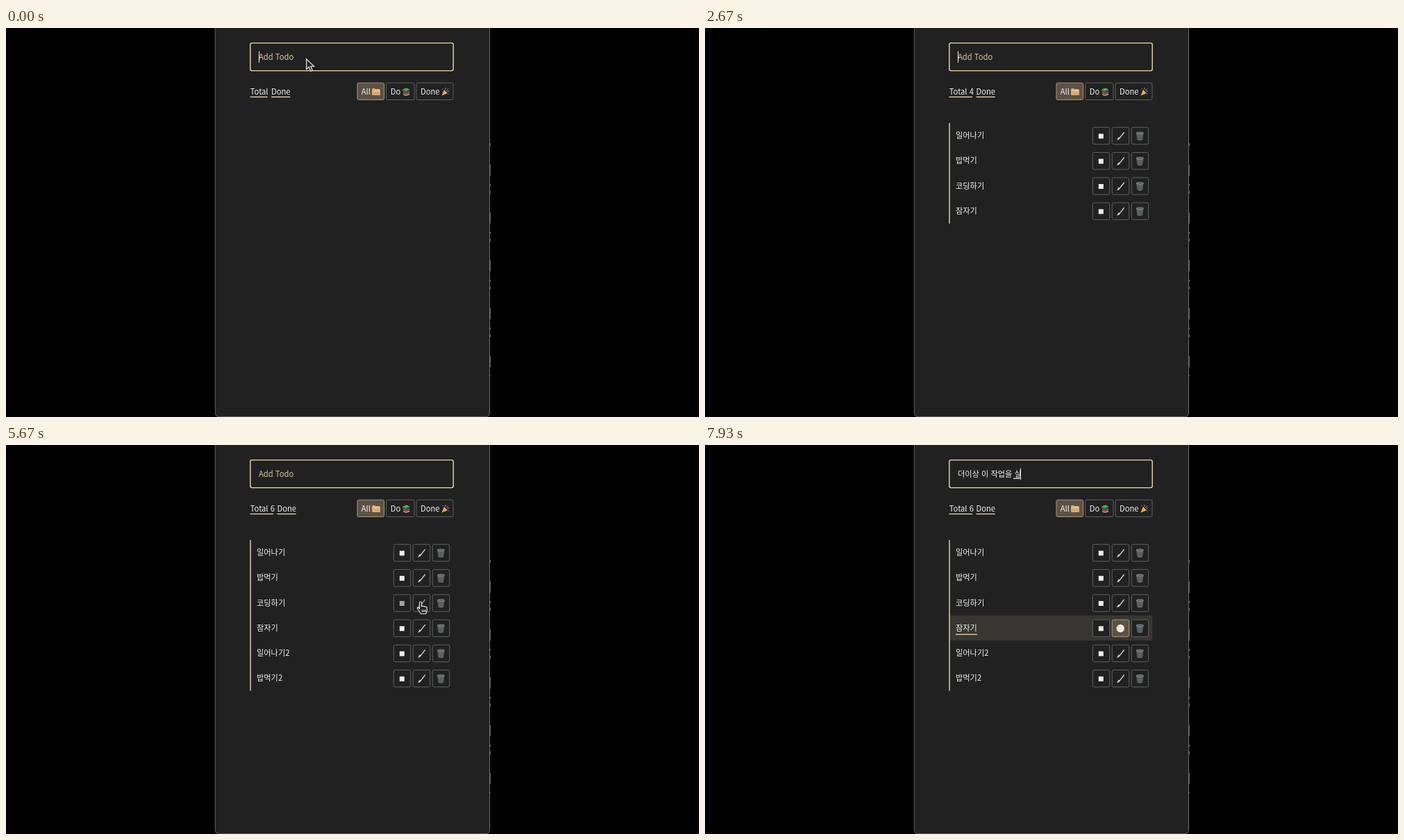
An HTML page for the animation above (8000 ms loop, 998 by 561 pixels).

```html
<!DOCTYPE html>
<html lang="ko">
<head>
<meta charset="utf-8">
<title>Todo list</title>
<style>
  html, body { margin: 0; height: 100%; overflow: hidden; background: #000; }
  svg { display: block; width: 998px; height: 561px; }
  text { font: 11.2px "Noto Sans CJK KR", "Noto Sans KR", sans-serif; fill: #f4f4f4; }
</style>
</head>
<body>
<svg viewBox="0 0 998 561">
  <defs>
    <g id="folder">
      <path d="M527 89q0-2 1.5-2h2.5l1 1.3h5.5q1.5 0 1.5 1.5v6q0 1.2-1.2 1.2h-9.6q-1.2 0-1.2-1.2z" fill="#dca873"/>
      <path d="M528 90.5h10.5M533 88v2.500M536 88v2.500" stroke="#f5d3a5" stroke-width=".9"/>
    </g>
    <g id="books">
      <path d="M571 88.500l6-2 4 2-5.500 2.500z" fill="#58a868"/>
      <path d="M571 88.500l4.500 2.500 5.500-2.200v2l-5.500 2.200-4.500-2.300z" fill="#2f7a48"/>
      <path d="M572 92l4 1.800 5-2v2.200l-5 1.800-4-1.800z" fill="#c84c48"/>
      <path d="M572 95l4 1.500 5-1.700v1.500l-5 1.500-4-1.600z" fill="#d9c5a4"/>
    </g>
    <g id="party">
      <path d="M627.500 97.500l3.300-8.500 5 5.300z" fill="#eab64c"/>
      <path d="M629.500 93l3 3M628.600 95.300l1.300 1.300" stroke="#b27a28" stroke-width=".8"/>
      <path d="M632 89q2-1 1-3M635 92.500q1-2 3-1.500" fill="none" stroke="#e08a5b"/>
      <g fill="#d66f75"><circle cx="629" cy="87.500" r=".7"/><circle cx="637" cy="95" r=".7"/></g>
      <path d="M634 90.500l3-3" stroke="#72a9dc"/>
    </g>
    <rect id="check" x="9" y="9.700" width="7" height="7" fill="#ececec"/>
    <g id="brush">
      <path d="M17.500 8l-6.500 8.300" stroke="#c9c9c9" stroke-width="1.500" stroke-linecap="round"/>
      <path d="M12 15.500q-1 3.300-5 3.400 1.800-1.500 2.400-4.300z" fill="#d8d2c5"/>
    </g>
    <g id="trash">
      <path d="M7.300 8.500l1.500 10.300q3.700 1.400 7.400 0l1.500-10.300z" fill="#666b6e"/>
      <path d="M9 10.500l1 8M12.500 11v8M16 10.500l-1 8M8 13h9M8.500 16h8" stroke="#444a4d" stroke-width=".6"/>
      <ellipse cx="12.500" cy="8.600" rx="5.300" ry="1.300" fill="#555b5e" stroke="#8a8f92" stroke-width=".8"/>
    </g>
    <circle id="save" cx="12.500" cy="12.900" r="5.700" fill="#e9e9e6"/>
    <path id="arrow" d="M.7.800v14.600l3.500-3.200 2.500 6 2.600-1.100-2.500-5.800h4.700z" fill="#222" stroke="#ddd" stroke-width="1.300"/>
    <path id="hand" d="M-1.500 10V1.500q0-1.500 1.500-1.500t1.500 1.500v5q1.300-1 2.500.300 1.500-.700 2.500.600 2.500-.5 2.700 1.600v3.500q0 2.500-1.500 5H.500q-2.500-4-5-7.500-.5-1.800 1-1.800zM2.500 11.500v3.500M4.800 11.500v3.500M7 11.500v3.500" fill="#222" stroke="#e2e2e2" stroke-width="1.200"/>
  </defs>
  <path d="M301 0v555q0 6 6 6h384q6 0 6-6V0z" fill="#212121"/>
  <path d="M301.300 0v555q0 5.600 6 5.600h383.200q6 0 6-5.600V0" fill="none" stroke="#666" stroke-width=".9"/>
  <path d="M696.500 0v556" stroke="#707070"/>
  <path d="M697.300 166v336" stroke="#8a8a8a" stroke-width=".8" stroke-dasharray="4 27 16 12 3 7"/>
  <g id="scene"></g>
</svg>
<script>
const LOOP = 8000, STEP = 200 / 3;
const SIZE = 11.2, GOLD = '#eed8ac';
const ROW_TOP = 137, ROW_H = 36.25, CELL_X = 558, CELL_Y = 143, CELL_GAP = 28, CELL = 25;
const EDIT_AT = 92, RETYPE_AT = 104, EDIT_ROW = 3;

// Keystrokes by first step: one state per step, empty means no change, ⏎ adds the item.
const typing = {
  1: 'ㅇ|이||일|일ㅇ|일어|일언|일어나|일어낙|일어나기|⏎',
  16: 'ㅂ|바|밥|밥ㅁ|밥머|밥먹|밥먹기|⏎|ㅋ|코|콛|코디||코딩|코딩ㅎ|코딩학|코딩하기||⏎|자|잠|잠자|잠자기||⏎',
  45: 'ㅇ|이|일|일어|일언|일어나||일어낙|일어나기||일어나기2||||⏎',
  67: 'ㅂ|바|밥|밥머|밥먹||밥먹기|밥먹기2||⏎',
  104: '더|덩|더이|더잇|더이상|더이상 |더이상 이|더이상 이 |더이상 이 자|더이상 이 작|더이상 이 작업|더이상 이 작업을|더이상 이 작업을 ||더이상 이 작업을 시|더이상 이 작업을 실',
};
const keys = [];
for (const [start, states] of Object.entries(typing))
  states.split('|').forEach((state, i) => keys[+start + i] = state);

// Pointer path: step, x, y
const path = [[79, 432, 44], [84, 574, 232], [85, 597, 226], [88, 614, 262], [91, 600, 276],
  [92, 600, 276], [93, 580, 225], [94, 530, 150], [95, 504, 116], [RETYPE_AT, 504, 116]];

function pointerAt(step) {
  if (step < 1) return [432, 44];
  if (step < path[0][0] || step >= RETYPE_AT) return null;
  const i = path.findIndex(p => p[0] > step);
  const [s0, x0, y0] = path[i - 1], [s1, x1, y1] = path[i];
  const k = (step - s0) / (s1 - s0);
  return [x0 + (x1 - x0) * k, y0 + (y1 - y0) * k];
}

function cellUnder(point, rows) {
  if (!point) return '';
  const x = point[0] - CELL_X, y = point[1] - CELL_Y;
  const col = Math.floor(x / CELL_GAP), row = Math.floor(y / ROW_H);
  const inside = col >= 0 && col < 3 && row >= 0 && row < rows && x % CELL_GAP < CELL && y % ROW_H < CELL;
  return inside ? row + ',' + col : '';
}

function stateAt(step) {
  const items = [];
  let text = '', entered = 0;
  for (let s = 1; s <= step; s++) {
    if (keys[s] === '⏎') {
      items.push(text);
      text = '';
      entered = s;
    } else if (keys[s]) text = keys[s];
  }
  return { items, text, caret: text !== '' || step - entered < 2 };
}

const widthOf = s => SIZE * [...s].reduce((w, c) => w + (c === ' ' ? .224 : c < 'A' ? .555 : .92), 0);
const label = (x, y, s, color = '#f4f4f4') => `<text x="${x}" y="${y}" style="fill:${color}">${s}</text>`;
const rect = (x, y, w, h, fill) => `<rect x="${x}" y="${y}" width="${w}" height="${h}" fill="${fill}"/>`;
const box = (x, y, w, h, on) =>
  `<rect x="${x + .5}" y="${y + .5}" width="${w - 1}" height="${h - 1}" rx="2" fill="${on ? '#5b5243' : '#212121'}" stroke="${on ? '#a79878' : '#606060'}"/>`;
const use = (id, x = 0, y = 0, opacity = 1) => `<use href="#${id}" x="${x}" y="${y}" opacity="${opacity}"/>`;

function inputField(text, caret, selected) {
  const x = 364, w = widthOf(text);
  let out = `<rect x="351.8" y="21.600" width="292.400" height="40" rx="2.500" fill="none" stroke="${GOLD}" stroke-width="1.400"/>`;
  if (selected) return out + rect(x, 33, widthOf(selected), 17, '#f2dcae') + label(x, 46.2, selected, '#4b463b');
  out += text ? label(x, 46.2, text) : label(x, 46.2, 'Add Todo', '#dac69c');
  if (/[ㄱ-ㅣ가-힣]$/.test(text)) {
    const last = widthOf(text.slice(-1));
    out += rect(x + w - last + .4, 47.7, last - .8, 1.2, '#f4f4f4');
  }
  return out + (caret ? rect(x + w, 33.5, 1, 16.5, '#f4f4f4') : '');
}

function toolbar(count) {
  const totalWidth = count ? 33.5 : 25, doneX = 351.7 + totalWidth + 5.3;
  return label(351.7, 95.8, count ? 'Total ' + count : 'Total') + rect(351.5, 98.8, totalWidth, 1.3, GOLD) +
    label(doneX, 95.8, 'Done') + rect(doneX, 98.8, 27.2, 1.3, GOLD) +
    box(505.5, 78.7, 39.5, 25.3, true) + label(511.7, 95.8, 'All') + use('folder') +
    box(547, 78.7, 41.5, 25.3) + label(553.7, 95.8, 'Do') + use('books') +
    box(590.5, 78.7, 54, 25.3) + label(597, 95.8, 'Done') + use('party');
}

function itemRow(name, row, editing, hovered) {
  const top = ROW_TOP + row * ROW_H, y = CELL_Y + row * ROW_H - .2;
  let out = editing ? rect(352, top, 292.5, ROW_H, '#383630') : '';
  out += label(361, top + 22, name);
  if (editing) out += rect(361, top + 35 - 8.2, widthOf(name), 1.3, GOLD);
  ['check', editing ? 'save' : 'brush', 'trash'].forEach((icon, col) => {
    const x = CELL_X - .2 + col * CELL_GAP;
    out += box(x, y, CELL + .4, CELL + .4, editing && col === 1) +
      use(icon, x, y, hovered.includes(row + ',' + col) ? .65 : 1);
  });
  return out;
}

function scene(step) {
  const { items, text, caret } = stateAt(step);
  const editing = step >= EDIT_AT;
  const selected = editing && step < RETYPE_AT ? items[EDIT_ROW] : '';
  const pointer = pointerAt(step);
  const under = cellUnder(pointer, items.length);
  const hovered = editing ? [] : [under, cellUnder(pointerAt(step - 1), items.length)];
  return inputField(text, caret, selected) + toolbar(items.length) +
    items.map((name, i) => itemRow(name, i, editing && i === EDIT_ROW, hovered)).join('') +
    rect(351.3, ROW_TOP, 1.4, items.length * ROW_H, GOLD) +
    (pointer ? use(under ? 'hand' : 'arrow', ...pointer) : '');
}

const stage = document.getElementById('scene');
let shown = -1;
function draw() {
  const step = Math.floor((performance.now() % LOOP + 4) / STEP) % 120;
  if (step !== shown) stage.innerHTML = scene(shown = step);
  requestAnimationFrame(draw);
}
draw();
</script>
</body>
</html>
```
